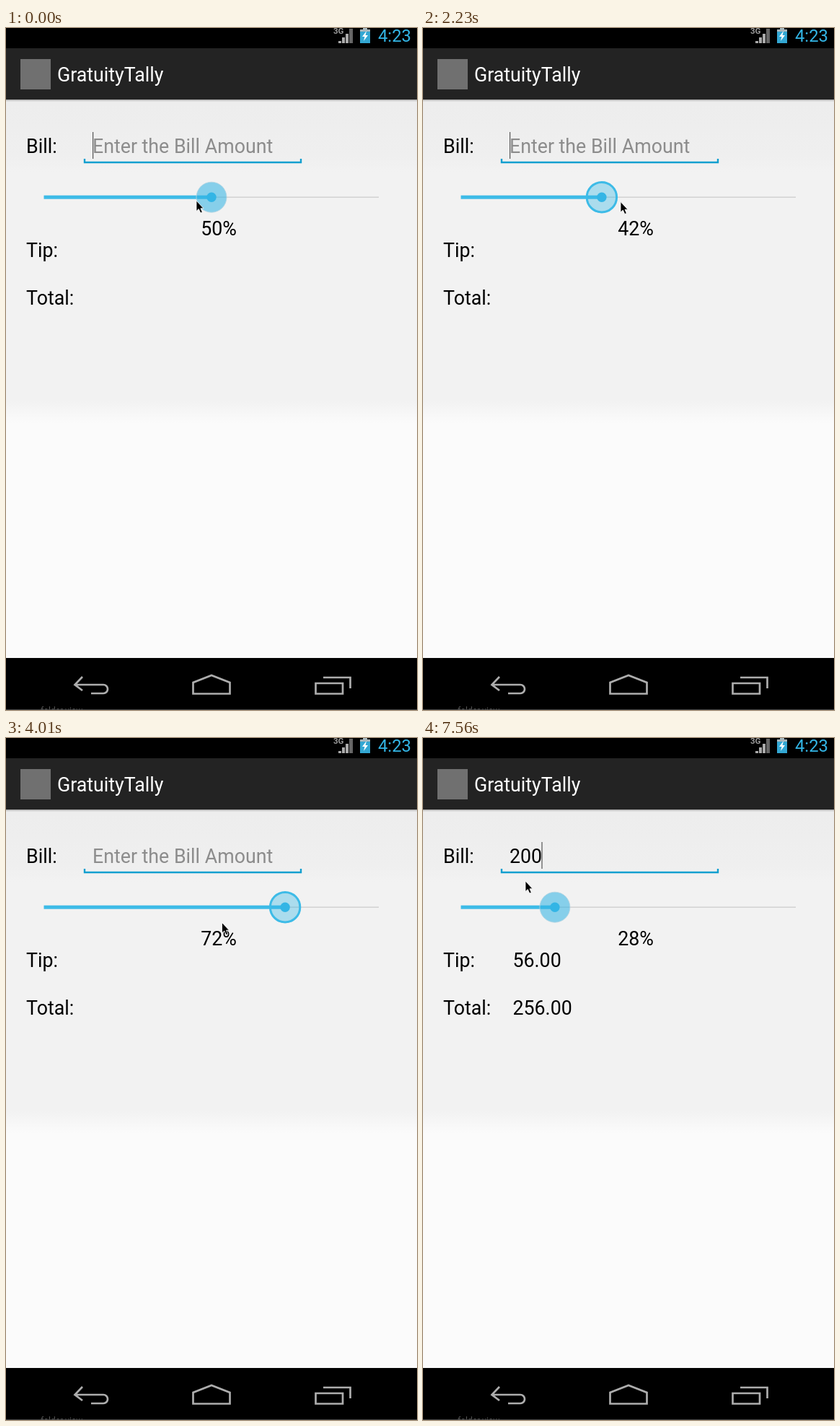
These frames come from a looping animation (570x944 px, 8000 ms). An HTML page:

```html
<!DOCTYPE html>
<html lang="en">
<head>
<meta charset="utf-8">
<title>Tip slider</title>
<style>
html, body { margin: 0; width: 100%; height: 100%; overflow: hidden; background: #000; }
svg { display: block; }
text { font: 26.75px Roboto, sans-serif; }
.nav { fill: none; stroke: #adadad; stroke-width: 2.700; }
</style>
</head>
<body>
<svg width="570" height="944" viewBox="0 0 570 944">
  <defs>
    <linearGradient id="page" x1="0" y1="0" x2="0" y2="1">
      <stop offset="0" stop-color="#ededed"/>
      <stop offset=".1" stop-color="#efefef"/>
      <stop offset=".13" stop-color="#f2f2f2"/>
      <stop offset=".54" stop-color="#f2f2f2"/>
      <stop offset=".58" stop-color="#fbfbfb"/>
      <stop offset="1" stop-color="#fbfbfb"/>
    </linearGradient>
    <linearGradient id="shade" x1="0" y1="0" x2="0" y2="1">
      <stop offset="0" stop-opacity=".28"/>
      <stop offset="1" stop-opacity="0"/>
    </linearGradient>
  </defs>

  <!-- Status bar -->
  <rect width="570" height="944"/>
  <text x="454" y="8" fill="#999" style="font-size:11.5px;font-weight:700">3G</text>
  <path d="M461 21v-3h4v3zM466 21v-8h4v8zM471 21v-13h4v13z" fill="#aaa"/>
  <path d="M476 21v-20h5v20z" fill="#666"/>
  <path d="M491 2h4v-2h6v2h4v19h-14z" fill="#33a7d3"/>
  <path d="M491 2h4v-2h6v2h4v3h-14z" fill="#a5b5bb"/>
  <path d="M500 4l-6 8h3.500l-1.500 6 6-8h-3.500z" fill="#fff"/>
  <text x="516" y="19" fill="#33b5e5" style="font-size:23.8px">4:23</text>

  <!-- Title bar and page -->
  <rect y="28" width="570" height="71" fill="#232323"/>
  <rect x="20" y="43" width="42" height="42" fill="#707070"/>
  <text x="71" y="74" fill="#fff">GratuityTally</text>
  <rect y="99" width="570" height="773" fill="url(#page)"/>
  <rect y="99" width="570" height="3" fill="url(#shade)"/>

  <!-- Form -->
  <text x="28" y="173">Bill:</text>
  <text x="28" y="317">Tip:</text>
  <text x="28" y="383">Total:</text>
  <text id="bill" x="120" y="173"></text>
  <text id="tip" x="124.500" y="317"></text>
  <text id="total" x="124.500" y="383"></text>
  <text id="percent" x="295" y="287" text-anchor="middle"></text>
  <rect id="caret" y="144" width="1.200" height="37" fill="#555"/>
  <path d="M109 181v5h300v-5" fill="none" stroke="#129fcf" stroke-width="2.400"/>

  <!-- Slider -->
  <path d="M53 234.300h464" stroke="#d2d2d2" stroke-width="1.600"/>
  <rect id="filled" x="52.500" y="231.700" height="5" fill="#3dbbe7"/>
  <g id="thumb">
    <circle id="halo"/>
    <circle r="6.700" fill="#33b5e5"/>
  </g>

  <!-- Navigation bar -->
  <path class="nav" d="M106 898L95.500 909 106 917M96 909H135a6 6 0 0 1 0 12H118"/>
  <path class="nav" d="M259.500 921.500V906L285 896 310.500 906V921.500z"/>
  <path class="nav" d="M429.500 907h37.500v14.500h-37.500zM440 899h37.500v15"/>
  <text x="48" y="949" fill="#555" style="font-size:12px">folder view</text>
  <rect y="943" width="570" height="1" fill="#444"/>

  <path id="pointer" d="M0 0V14.500L3.300 11.500 5.800 17 8.300 16 6 10.700H10z"
        stroke="#fff" stroke-width=".8"/>
</svg>
<script>
const $ = id => document.getElementById(id);
const LOOP = 8000, STEPS = 54, STEP = LOOP / STEPS;
const PRESS = 10, RELEASE = 37, LAG = 1;

// Turning points of the hand: step, x, y
const turns = [
  [1, 264, 239], [9, 285, 241], [11.8, 225, 240], [21.4, 421, 242], [24, 481, 244],
  [29.1, 196, 262], [34, 183, 249], [36, 183, 249], [39, 146, 199], [42, 142, 198]
];

// Pointer position, swinging with cosine easing from one turn to the next
function hand(n) {
  let i = 1;
  while (i < turns.length - 1 && turns[i][0] < n) i++;
  const [t0, x0, y0] = turns[i - 1], [t1, x1, y1] = turns[i];
  const f = Math.min(1, Math.max(0, (n - t0) / (t1 - t0)));
  const e = (1 - Math.cos(Math.PI * f)) / 2;
  return [x0 + (x1 - x0) * e, y0 + (y1 - y0) * e];
}

function set(id, attrs) {
  for (const k in attrs) $(id).setAttribute(k, attrs[k]);
}

function draw(now) {
  const n = Math.floor(now % LOOP / STEP);
  const pressed = n >= PRESS && n <= RELEASE;

  // The slider follows the pressed hand, a step late.
  const [grip] = hand(Math.min(34, Math.max(PRESS, n) - LAG));
  const percent = Math.round((grip - 53) / 4.64);
  const thumbX = 53 + 4.64 * percent;

  const typed = [46, 49, 51].filter(key => n >= key).length;
  const bill = "200".slice(0, typed);
  const tip = bill * percent / 100;
  const caretOn = typed || Math.floor((n * STEP + 225) / 530) % 2 === 0;

  $("bill").textContent = bill || "Enter the Bill Amount";
  set("bill", { fill: bill ? "#000" : "#8c8c8c" });
  $("tip").textContent = bill && tip.toFixed(2);
  $("total").textContent = bill && (+bill + tip).toFixed(2);
  $("percent").textContent = percent + "%";
  set("caret", { x: 120 + 14.8 * typed, opacity: caretOn ? 1 : 0 });

  set("filled", { width: thumbX - 52.5 });
  set("thumb", { transform: `translate(${thumbX} 234.2)` });
  set("halo", {
    r: pressed ? 20.7 : 21,
    fill: "#33b5e5",
    "fill-opacity": pressed ? .37 : .56,
    stroke: pressed ? "#3dbbe7" : "#b5d5e1",
    "stroke-width": pressed ? 3 : .8
  });
  set("pointer", { transform: `translate(${hand(n)})` });
}

const start = performance.now();
function tick() {
  draw(performance.now() - start);
  requestAnimationFrame(tick);
}
tick();
</script>
</body>
</html>
```
